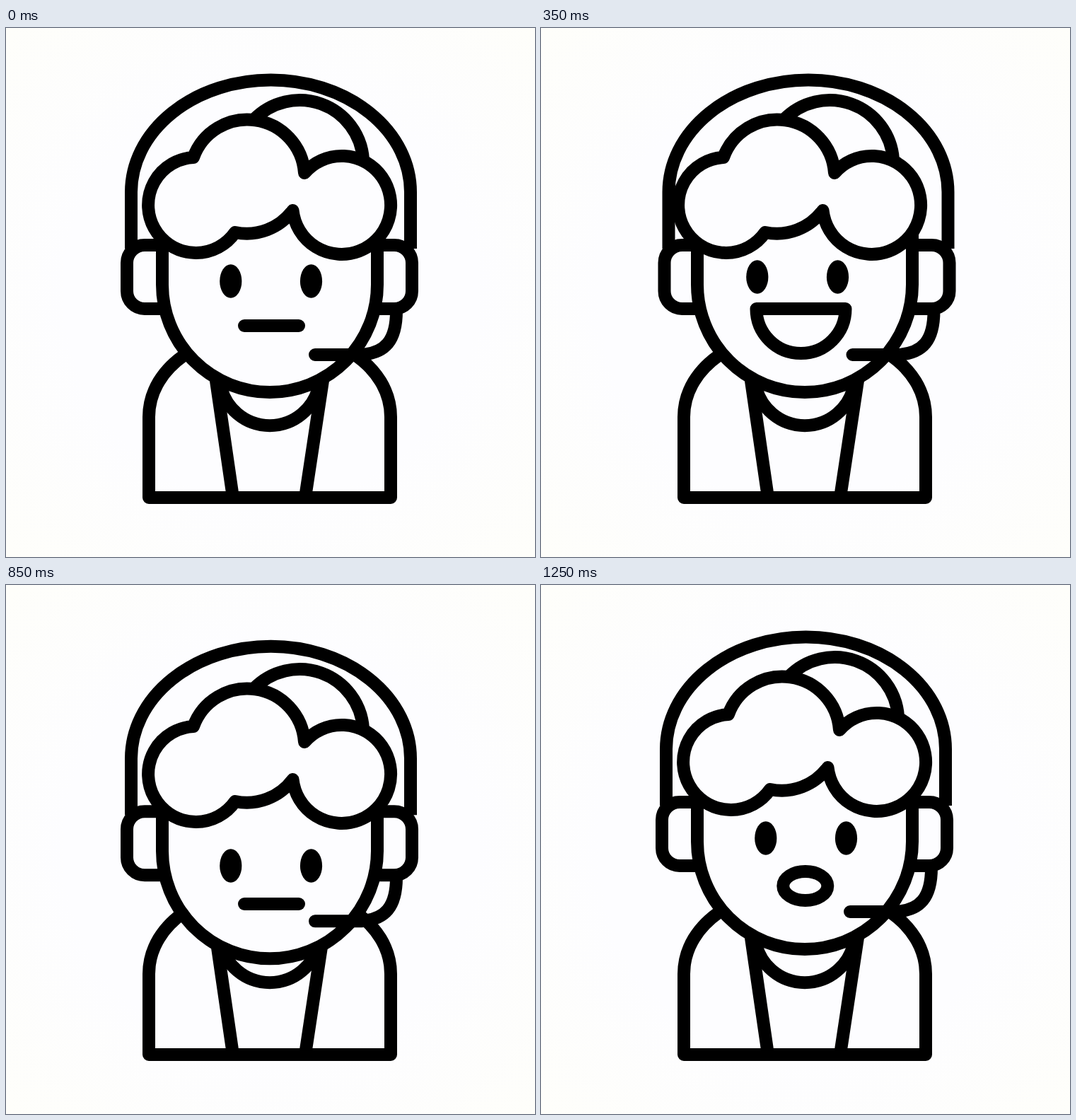
These frames come from a looping animation (748 px wide and 748 px high, 1.3 s). An HTML page:

```html
<!DOCTYPE html>
<html lang="en">
<head>
<meta charset="utf-8">
<title>Support agent</title>
<style>
  @property --turn { syntax: "<number>"; inherits: true; initial-value: 0; }
  @property --nod { syntax: "<number>"; inherits: true; initial-value: 0; }

  html, body { margin: 0; width: 100%; height: 100%; overflow: hidden; }
  body { background: radial-gradient(circle, #fdfdff 55%, #fefefa 100%); }

  svg {
    --ease: cubic-bezier(.333, 0, .667, 1);
    display: block;
    width: 100%;
    height: 100%;
    fill: none;
    stroke: #000;
    stroke-width: 18;
    stroke-linejoin: round;
    animation: turn 1.3s var(--ease) infinite, nod 1.3s var(--ease) infinite;
  }

  /* Each layer follows the head turn and nod by its own amount. */
  .layer {
    transform: translate(
      calc(var(--turn) * var(--tx, 0) * 1px),
      calc(var(--turn) * var(--ty, 0) * 1px + var(--nod) * var(--ny) * 1px));
  }
  .headset { --tx: 3.5; --ny: 13.3; }
  .face    { --ny: 13.3; }
  .hair    { --tx: -7; --ny: 17; }
  .eyes    { --tx: -12; --ty: -6; --ny: 39; }
  .mouth   { --tx: -7.5; --ty: -13.5; --ny: 30; }

  .skin { fill: #fdfdff; }
  .eyes { fill: #000; stroke: none; }
  .mouth, .mic { stroke-linecap: round; }
  .mouth > * { visibility: hidden; animation: 1.3s step-end infinite; }
  .mouth .flat  { animation-name: flat; }
  .mouth .open  { animation-name: open; }
  .mouth .round { animation-name: round; }
  .mouth .smile { animation-name: smile; }

  @keyframes turn {
    0%, 50%, 100% { --turn: 0; }
    15.38%, 36.15% { --turn: 1; }
  }
  @keyframes nod {
    0%, 30.77%, 88.46%, 100% { --nod: 0; }
    50%, 69.23% { --nod: 1; }
  }
  @keyframes flat {
    0%, 61.53% { visibility: visible; }
    15.38%, 76.92%, 100% { visibility: hidden; }
  }
  @keyframes open {
    0%, 30.76%, 92.3%, 100% { visibility: hidden; }
    15.38%, 76.92% { visibility: visible; }
  }
  @keyframes round {
    0%, 46.15% { visibility: hidden; }
    30.76%, 92.3%, 100% { visibility: visible; }
  }
  @keyframes smile {
    0%, 61.53%, 100% { visibility: hidden; }
    46.15% { visibility: visible; }
  }
</style>
</head>
<body>
<svg viewBox="0 0 748 748">
  <g class="body">
    <path d="M256 460C222 482 202 514 202 550V664H544V550C544 514 524 482 490 460"/>
    <path d="M296 492L321 664M449 492L423 664"/>
    <path d="M303 503A71 71 0 0 0 443 503"/>
  </g>

  <g class="layer headset">
    <path d="M177 312V232A197.5 158.5 0 0 1 572 232V312"/>
    <path d="M222 307H196A25 25 0 0 0 171 332V372A25 25 0 0 0 196 397H224"/>
    <path d="M524 307H549A25 25 0 0 1 574 332V372A25 25 0 0 1 549 397H522"/>
  </g>

  <path class="layer face skin" d="M221 280V363A152 152 0 0 0 525 363V280"/>

  <path class="layer headset mic" d="M437 462H496C538 462 552 440 552 400"/>

  <g class="layer hair">
    <path d="M350 130A90 90 0 0 1 505 186"/>
    <path class="skin" d="M265 183A81 81 0 0 1 422 205A69.5 69.5 0 1 1 405.5 258A81 81 0 0 1 324 289A67.5 67.5 0 1 1 265 183Z"/>
  </g>

  <g class="layer eyes">
    <ellipse cx="317.8" cy="358" rx="15.6" ry="23.7"/>
    <ellipse cx="431.5" cy="358" rx="15.6" ry="23.7"/>
  </g>

  <g class="layer mouth">
    <path class="flat" d="M337 421H414"/>
    <path class="open" d="M312 410.5H438A63 63 0 0 1 312 410.5Z"/>
    <ellipse class="round" cx="373.8" cy="425.5" rx="31.5" ry="20.5"/>
    <path class="smile" d="M326 413.5A49 49 0 0 0 424 413.5"/>
  </g>
</svg>
</body>
</html>
```
